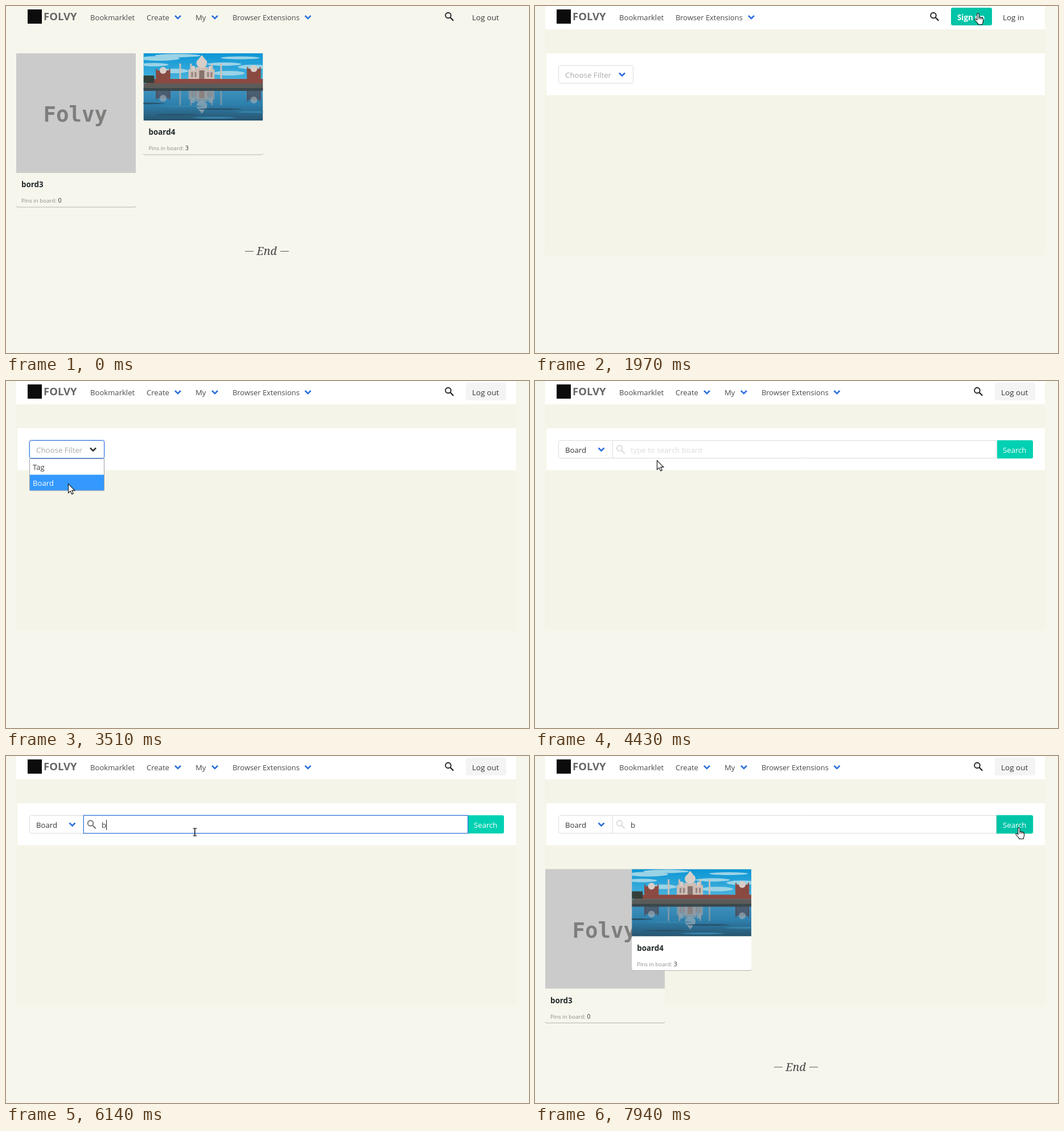
An HTML page with a canvas for the animation above (8 s loop, 919 by 609 pixels).

```html
<!DOCTYPE html>
<html lang="en">
<head>
<meta charset="utf-8">
<title>Board search</title>
<style>
html, body { margin: 0; width: 100%; height: 100%; overflow: hidden; background: #f7f6ed; }
canvas { display: block; }
</style>
</head>
<body>
<canvas id="stage" width="919" height="609"></canvas>
<script>
const ctx = document.getElementById('stage').getContext('2d');
const LOOP = 8000;
const SANS = '"Open Sans", "Noto Sans", sans-serif';
const INK = '#363636', NAV = '#4a4a4a', BLUE = '#2b6fdc', LINE = '#dbdbdb';
const TEAL = '#00d1b2', TEAL_HOVER = '#00c4a7', PAGE = '#f7f6ed';

// start, end, steps, from x, y, to x, y
const MOVES = [
  [110, 260, 3, 793, 606, 699, 494],
  [420, 1190, 11, 699, 494, 778, 12],
  [2050, 2580, 8, 778, 12, 105, 117],
  [3120, 3510, 6, 105, 117, 109, 180],
  [4120, 4660, 8, 109, 180, 263, 120],
  [5590, 5990, 6, 263, 120, 331, 133],
  [6920, 7470, 8, 331, 133, 850, 125]
];

const ARROW = new Path2D('M0 0V16L3.7 12.6 6.2 18.3 8.8 17.2 6.3 11.6H11.4Z');
const HAND = new Path2D('M-1.7 12V2a1.6 1.6 0 0 1 3.2 0V7l5.2 1q2.3.6 2.3 3v3.5q0 2-1.3 3.8V20H0v-1.6L-5 13q-1.6-2.2.4-2.8 1-.2 2.9 1.8z');

const between = (t, a, b) => t >= a && t < b;
const smooth = p => p * p * (3 - 2 * p);

function rect(x, y, w, h, color) {
  ctx.fillStyle = color;
  ctx.fillRect(x, y, w, h);
}

function text(str, x, y, size = 13.1, color = NAV, weight = 400, family = SANS) {
  ctx.font = `${weight} ${size}px ${family}`;
  ctx.fillStyle = color;
  ctx.fillText(str, x, y);
}

function box(x, y, w, h, radius, fill, stroke) {
  ctx.beginPath();
  ctx.roundRect(x, y, w, h, radius);
  if (fill) { ctx.fillStyle = fill; ctx.fill(); }
  if (stroke) { ctx.strokeStyle = stroke; ctx.lineWidth = 1; ctx.stroke(); }
}

function poly(points, color, width) {
  ctx.beginPath();
  for (let i = 0; i < points.length; i += 2) ctx.lineTo(points[i], points[i + 1]);
  if (width) {
    ctx.strokeStyle = color;
    ctx.lineWidth = width;
    ctx.stroke();
  } else {
    ctx.fillStyle = color;
    ctx.fill();
  }
}

function ellipse(x, y, rx, ry, color) {
  ctx.beginPath();
  ctx.ellipse(x, y, rx, ry, 0, 0, Math.PI * 2);
  ctx.fillStyle = color;
  ctx.fill();
}

function chevron(x, y, color = BLUE) {
  poly([x - 5, y - 2.5, x, y + 2.5, x + 5, y - 2.5], color, 2.6);
}

function magnifier(x, y, color) {
  ctx.beginPath();
  ctx.arc(x - 2, y - 2, 4.8, 0, Math.PI * 2);
  ctx.strokeStyle = color;
  ctx.lineWidth = 1.9;
  ctx.stroke();
  poly([x + 1.5, y + 1.5, x + 7.2, y + 7.2], color, 2.3);
}

function header(t) {
  const plain = t < 1820, guest = between(t, 1820, 2050);
  if (!plain) rect(18, 0, 878, 41, '#fff');
  rect(38, 6, 25, 25, '#0c0c0c');
  text('FOLVY', 66, 25, 18.5, '#666', 700);
  text('Bookmarklet', 148, 24.5);
  if (guest) {
    text('Browser Extensions', 247, 24.5, 12.9);
    chevron(380, 19.5);
    magnifier(702, 18.5, '#222');
    box(731, 3, 72, 31, 3, TEAL_HOVER);
    text('Sign up', 742, 24.5, 13.3, '#fff', 700);
    text('Log in', 822, 24.5, 13.4, INK);
    return;
  }
  text('Create', 247, 24.5);
  chevron(302, 19.5);
  text('My', 333, 24.5);
  chevron(367, 19.5);
  text('Browser Extensions', 398, 24.5, 12.9);
  chevron(530.5, 19.5);
  if (between(t, 1110, 1820)) rect(763, 0, 41, 41, '#fcfbfd');
  magnifier(779, 18.5, '#222');
  if (!plain) box(808, 3, 71, 31, 3, '#f4f4f4');
  text('Log out', 819, 24.5, 13.5, INK);
}

function palace(wall, dome, brick) {
  for (const [x, w, h] of [[22, 25, 16], [182, 24, 19]]) {
    rect(x, 46 - h, w, h, brick);
    ellipse(x + w / 2, 46 - h, 6, 6, dome);
    rect(x, 43 - h, 2, h, brick);
    rect(x + w - 2, 43 - h, 2, h, brick);
  }
  rect(79, 28, 46, 18, wall);
  rect(92, 24, 21, 22, wall);
  ellipse(102.5, 17, 9.5, 8.5, dome);
  poly([97, 10, 102.5, 3, 108, 10], dome);
  ellipse(87, 26, 4, 4, dome);
  ellipse(118, 26, 4, 4, dome);
  for (const x of [63, 82, 119, 135]) rect(x, 18, 3, 28, wall);
  rect(98, 30, 9, 16, '#87736c');
  for (const x of [84, 90, 112, 118]) rect(x, 33, 3, 9, '#96817a');
  rect(4, 45, 206, 8, brick);
}

function landscape(x, y) {
  ctx.save();
  ctx.translate(x, y);
  ctx.beginPath();
  ctx.rect(0, 0, 210, 118);
  ctx.clip();
  const sky = ctx.createLinearGradient(0, 0, 0, 50);
  sky.addColorStop(0, '#0c96d6');
  sky.addColorStop(1, '#4cb4dc');
  rect(0, 0, 210, 54, sky);
  for (const [cx, cy, rx, ry] of [[28, 9, 36, 4], [60, 4, 40, 3], [18, 20, 26, 3],
    [142, 19, 30, 3], [170, 8, 34, 2.5], [192, 24, 26, 4], [55, 31, 24, 4], [150, 35, 28, 4]])
    ellipse(cx, cy, rx, ry, '#9bd3e6');
  palace('#cdbfb7', '#d8cec8', '#8a4a42');
  rect(0, 39, 19, 13, '#33403a');
  const water = ctx.createLinearGradient(0, 62, 0, 118);
  water.addColorStop(0, '#4092be');
  water.addColorStop(0.5, '#2d7fac');
  water.addColorStop(1, '#28546e');
  rect(0, 62, 210, 56, water);
  ctx.save();
  ctx.translate(0, 109);
  ctx.scale(1, -1);
  ctx.globalAlpha = 0.65;
  palace('#9b9fa3', '#a3adb4', '#54464d');
  ctx.restore();
  for (let i = 0; i < 6; i++)
    ellipse((i * 67) % 210, 88 + i * 5, 38, 1.5, i % 2 ? '#3684ac' : '#28546e');
  rect(0, 53, 210, 9, '#5b5c59');
  rect(0, 61, 210, 5, '#3a474c');
  ctx.restore();
}

function card(x, y, imageHeight, title, count, fill) {
  const bottom = y + imageHeight;
  box(x, bottom, 210, 60, [0, 0, 3, 3], fill);
  ctx.beginPath();
  ctx.moveTo(x, bottom + 58);
  ctx.quadraticCurveTo(x + 0.5, bottom + 60, x + 2, bottom + 60);
  ctx.lineTo(x + 208, bottom + 60);
  ctx.quadraticCurveTo(x + 210, bottom + 60, x + 210, bottom + 58);
  ctx.strokeStyle = '#b5b5b0';
  ctx.lineWidth = 1;
  ctx.stroke();
  text(title, x + 9, bottom + 25, 13.4, '#222a2a', 700);
  text('Pins in board:', x + 9, bottom + 52, 9.7, '#8c8c88');
  text(count, x + 73.5, bottom + 52, 10.5, '#333');
}

function boards(y, secondX, fill) {
  rect(18, y, 210, 210, '#cbcbcb');
  text('Folvy', 65.5, y + 120, 37.4, '#7e7e7c', 700, '"DejaVu Sans Mono", monospace');
  card(18, y, 210, 'bord3', '0', PAGE);
  card(secondX, y, 118, 'board4', '3', fill);
  landscape(secondX, y);
  text('End', 440.5, y + 354, 19.6, '#444', 'italic 400', '"Noto Serif", serif');
  rect(420, y + 347, 15, 1, '#555');
  rect(482, y + 347, 15, 1, '#555');
}

function glow(x, y, w, h, radius, color) {
  ctx.beginPath();
  ctx.roundRect(x, y, w, h, radius);
  ctx.strokeStyle = color;
  ctx.lineWidth = 3.5;
  ctx.stroke();
}

function filterSelect(t) {
  const focused = between(t, 2650, 4120);
  if (focused) glow(41.5, 104.5, 131, 31, 3, 'rgba(50,115,220,.25)');
  box(41.5, 104.5, 131, 31, 3, '#fff', focused ? '#3273dc' : LINE);
  text('Choose Filter', 53, 126, 13.3, '#a9a9a9');
  chevron(153, 120, between(t, 2580, 4120) ? '#333' : BLUE);
}

function options(t) {
  const active = t < 3270 ? -1 : t < 3420 ? 0 : 1;
  rect(41, 136, 132, 57, '#fff');
  if (active >= 0) rect(42, 136.5 + active * 28, 130, 28, '#3399ff');
  box(41.5, 136.5, 131, 55.5, 0, null, '#9a9fa8');
  ['Tag', 'Board'].forEach((name, i) =>
    text(name, 47, 156 + i * 28, 13.2, i === active ? '#fff' : '#444'));
}

function searchBar(t) {
  const focused = between(t, 4530, 7620), hover = t >= 7390;
  box(41.5, 104.5, 95, 31, [3, 0, 0, 3], '#fff', LINE);
  text('Board', 53, 126, 13.2, INK);
  chevron(116.5, 120);
  box(812, 104, 63, 32, [0, 3, 3, 0], hover ? TEAL_HOVER : TEAL);
  if (t >= 7620) {
    glow(811.5, 104.5, 63, 31, [0, 3, 3, 0], 'rgba(0,209,178,.25)');
    rect(811, 104, 2, 32, TEAL_HOVER);
  }
  text('Search', 822, 126, 13.2, '#fff');
  if (focused) glow(136.5, 104.5, 675, 31, 0, 'rgba(50,115,220,.25)');
  box(136.5, 104.5, focused ? 675 : 674, 31, 0, '#fff', focused ? '#3273dc' : LINE);
  magnifier(150.5, 120, focused ? '#777' : LINE);
  if (t < 6140) text('type to search board', 168, 126, 13.1, '#dcdcdc');
  else text('b', 168, 126, 13.2, INK);
  if (between(t, 4530, 5060) || between(t, 5590, 6140)) rect(168, 112, 1, 18, '#222');
  if (between(t, 6140, 6690) || between(t, 7220, 7470)) rect(176, 112, 1, 18, '#222');
}

function candidates() {
  box(167.5, 129.5, 318, 61, 0, '#fff', '#adb1b5');
  text('b', 179, 151.5, 17, '#1266c4', 700);
  rect(190, 136, 1, 20, '#f03030');
  rect(168, 159, 283, 1, '#dcdcdc');
  ellipse(468, 147, 16.5, 16.5, '#fbA98c');
  [...'吧把被不比'].forEach((glyph, i) => {
    const x = 179 + i * 49, color = i ? '#1c8ede' : '#f52828';
    text(`${i + 1}.`, x, 180.5, 17, color, 400, '"Liberation Serif", serif');
    text(glyph, x + 18, 180.5, 17, color, 300, '"Noto Sans CJK SC", "Noto Sans CJK", sans-serif');
  });
  poly([436, 171, 431, 175.5, 436, 180], '#cfcfcf', 1.8);
  poly([447, 171, 452, 175.5, 447, 180], '#f0684a', 2);
  poly([465, 173, 469.5, 177.5, 474, 173], '#f0684a', 2);
}

function pointerAt(t) {
  let pos = null;
  for (const [start, end, steps, x0, y0, x1, y1] of MOVES) {
    if (t < start) break;
    const step = Math.floor((t - start) / (end - start) * (steps - 1)) + 1;
    const raw = Math.min(1, step / steps);
    const p = steps > 3 ? smooth(raw) : raw;
    pos = [x0 + (x1 - x0) * p, y0 + (y1 - y0) * p];
  }
  return pos;
}

function pointer(t) {
  const pos = pointerAt(t);
  if (!pos) return;
  const [x, y] = pos.map(Math.round);
  const hand = (t < 2050 && y < 41) || (t > 6900 && x >= 812);
  const overPopup = between(t, 5210, 6140) && y >= 130;
  const beam = t > 4200 && x > 137 && y < 137 && !hand && !overPopup;
  ctx.save();
  ctx.translate(x + 0.5, y + 0.5);
  if (beam) {
    for (const [a, b, w, h] of [[-3, -7, 7, 1], [-0.5, -7, 1.5, 14], [-3, 6, 7, 1]])
      rect(a, b, w, h, '#111');
  } else {
    const shape = hand ? HAND : ARROW;
    ctx.fillStyle = '#fff';
    ctx.strokeStyle = '#111';
    ctx.lineWidth = 1.1;
    ctx.fill(shape);
    ctx.stroke(shape);
    if (hand) {
      poly([1.5, 6.5, 1.5, 11], '#111', 1);
      poly([4.2, 7.6, 4.2, 11], '#111', 1);
      poly([6.6, 8.2, 6.6, 11], '#111', 1);
    }
  }
  ctx.restore();
}

function draw(t) {
  rect(0, 0, 919, 609, PAGE);
  if (t >= 1820) rect(18, 0, 878, 437, '#f5f4e8');
  header(t);
  if (t < 1820) {
    boards(83, 241.5, PAGE);
  } else {
    rect(20, 83, 876, 73.5, '#fff');
    if (t < 4200) filterSelect(t);
    else searchBar(t);
    if (between(t, 2800, 4120)) options(t);
    if (between(t, 5210, 6140)) candidates();
    if (t >= 7780) {
      const p = Math.min(1, (t - 7780) / 370);
      boards(198.5, 18 + 223.5 * (1 - (1 - p) ** 2), '#fff');
    }
  }
  pointer(t);
}

const origin = performance.now();
function tick() {
  draw((performance.now() - origin) % LOOP);
  requestAnimationFrame(tick);
}
tick();
</script>
</body>
</html>
```
